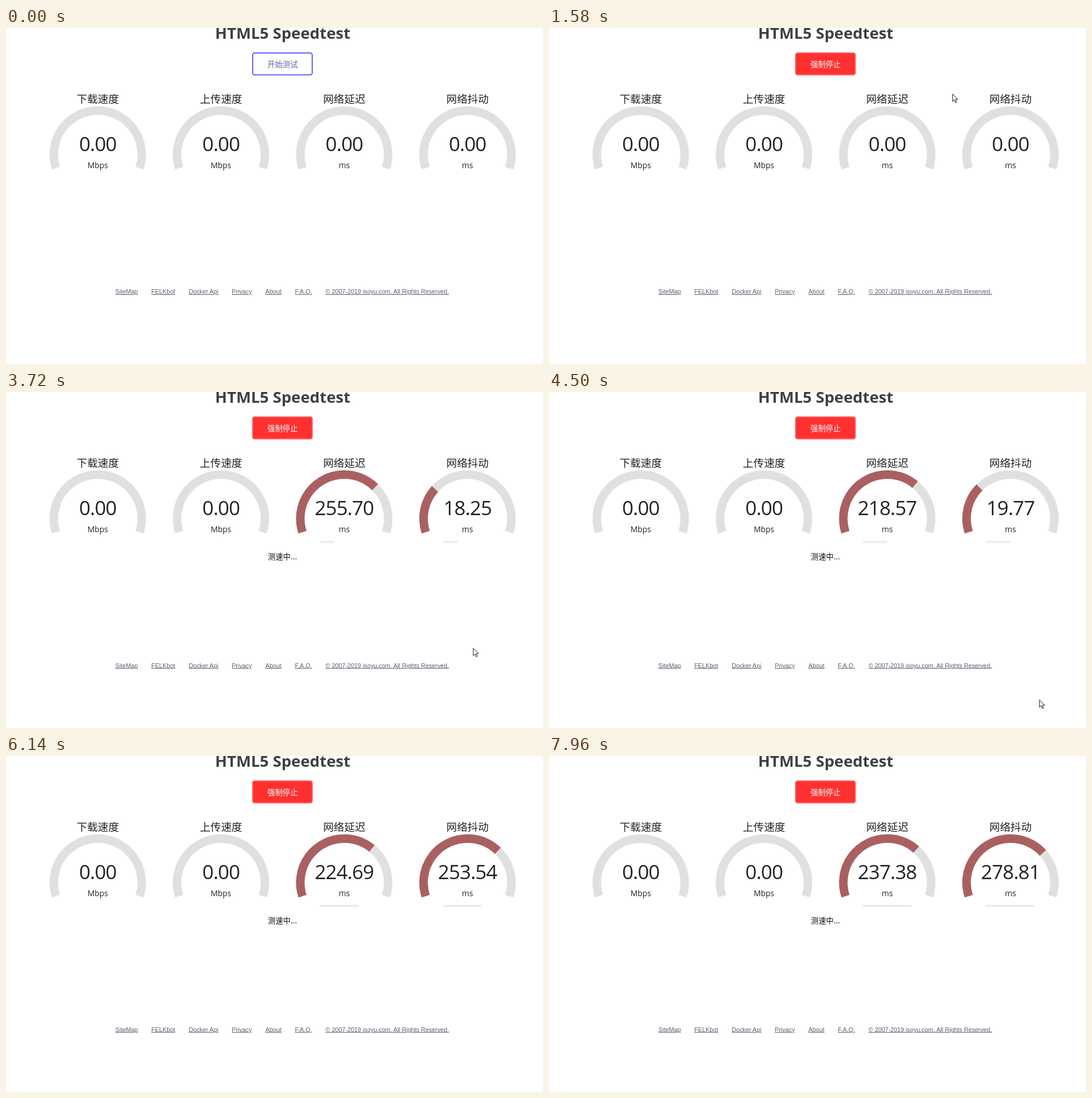
Recreate the animation shown at these times as an HTML page. Size 947 px wide and 592 px high, loop 8 s.

```html
<!DOCTYPE html>
<html lang="zh-CN">
<head>
<meta charset="utf-8">
<title>HTML5 Speedtest</title>
<style>
  html, body { margin: 0; width: 100%; height: 100%; overflow: hidden; background: #fff; }
  svg { display: block; width: 100%; height: 100%; }
  text { font-family: "Open Sans", "Noto Sans", "Noto Sans CJK SC", "Noto Sans CJK", sans-serif; fill: #222; }
  .mid { text-anchor: middle; }
  .title { font-size: 27.6px; font-weight: 700; fill: #404040; }
  .name { font-size: 18.7px; }
  .value { font-size: 35px; letter-spacing: -.9px; }
  .unit { font-size: 13.9px; }
  .small { font-size: 13.4px; }
  .name, .small { font-family: "Noto Sans CJK SC", "Noto Sans CJK", sans-serif; }
  #links text { font: 10.82px "Liberation Sans", Arial, sans-serif; fill: #566272; text-decoration: underline; }
</style>
</head>
<body>
<svg viewBox="0 0 947 592">
  <text class="mid title" x="488" y="18.5">HTML5 Speedtest</text>
  <rect id="button" x="435" y="44" width="105" height="38.5" rx="3.5" stroke-width="2"/>
  <text id="action" class="mid small" x="487.8" y="68.5"></text>
  <g id="meters"></g>
  <text id="status" class="mid small" x="487.5" y="294.8" style="fill:#111">测速中...</text>
  <g id="links"></g>
  <path id="cursor" d="M.5 .5V13.6L3.5 10.8 5.6 15.7 7.7 14.8 5.6 10H9.8Z" fill="#fff" stroke="#111"/>
</svg>
<script>
const LOOP = 8000, CLICK = 1210, START = 1750, FIRST = 2530;
const POLL = 137.5, OVERHEAD = 210;
const $ = id => document.getElementById(id);

function add(parent, tag, attrs, text = '') {
  const el = document.createElementNS('http://www.w3.org/2000/svg', tag);
  for (const k in attrs) el.setAttribute(k, attrs[k]);
  el.textContent = text;
  return parent.appendChild(el);
}

// Dial: 216 degrees, centred on (x, 223)
const R = 77.5, CY = 223, TILT = Math.PI / 10;
function meter([name, unit], i) {
  const g = $('meters'), x = 161.8 + 217.35 * i;
  const dx = R * Math.cos(TILT), y = CY + R * Math.sin(TILT);
  const arc = {
    d: `M${x - dx} ${y}A${R} ${R} 0 1 1 ${x + dx} ${y}`,
    fill: 'none', 'stroke-width': 15, pathLength: 1
  };
  const label = (cls, ly, s) => add(g, 'text', { class: 'mid ' + cls, x, y: ly }, s);
  add(g, 'path', { ...arc, stroke: '#e0e0e0' });
  label('name', 132.2, name);
  label('unit', 247, unit);
  return {
    fill: add(g, 'path', { ...arc, stroke: '#aa6060', visibility: 'hidden' }),
    bar: add(g, 'rect', { x: x - 43.2, y: 262, width: 0, height: 4, fill: '#eee' }),
    value: label('value', 217, '0.00')
  };
}
const [, , ping, jitter] = [
  ['下载速度', 'Mbps'], ['上传速度', 'Mbps'], ['网络延迟', 'ms'], ['网络抖动', 'ms']
].map(meter);

let linkX = 192.8;
for (const s of ['SiteMap', 'FELKbot', 'Docker Api', 'Privacy', 'About', 'F.A.Q.',
  '© 2007-2019 isoyu.com. All Rights Reserved.']) {
  linkX += add($('links'), 'text', { x: linkX, y: 468 }, s).getComputedTextLength() + 23.8;
}

// Round trips in ms; ping and jitter are smoothed from them after a warm-up
const trips = [273.95, 255.7, 239.14, 218.573, 562.058, 221.173, 238.758, 519.01, 237.38];
const samples = [{ at: FIRST, ping: 0, jitter: 0 }];
let clock = 0;
trips.forEach((rtt, i) => {
  const last = samples[i], diff = i ? Math.abs(rtt - trips[i - 1]) : 0;
  const keep = diff > last.jitter ? 0.3 : 0.8;
  clock += rtt + OVERHEAD;
  samples.push({
    at: FIRST + Math.ceil(clock / POLL) * POLL,
    ping: !i || rtt < last.ping ? rtt : last.ping * 0.8 + rtt * 0.2,
    jitter: i < 2 ? diff : last.jitter * keep + diff * (1 - keep)
  });
});

// time, x, y of the pointer
const route = [
  [110, 845, 571], [260, 641, 218], [430, 649, 218], [730, 545, 17], [1040, 490, 62],
  [1300, 490, 62], [1580, 711, 115], [1990, 808, 466], [2370, 823.5, 451],
  [3780, 823.5, 451], [4740, 878, 572], [4910, 898, 594]
];

function pointAt(t) {
  const i = route.findIndex(p => p[0] > t);
  if (i < 1) return null;
  const [a, b] = [route[i - 1], route[i]];
  const k = (t - a[0]) / (b[0] - a[0]);
  return [a[1] + (b[1] - a[1]) * k, a[2] + (b[2] - a[2]) * k];
}

function show(m, ms, done, t) {
  const swing = 1 + 0.02 * Math.sin(t / 100);
  const part = 1 - Math.pow(1.08, -Math.sqrt(ms * swing));
  m.fill.setAttribute('stroke-dasharray', `${part} 2`);
  m.fill.setAttribute('visibility', ms ? 'visible' : 'hidden');
  m.bar.setAttribute('width', 86 * done);
  m.value.textContent = ms.toFixed(2);
}

function draw(t) {
  const running = t >= CLICK, testing = t >= START;
  $('button').setAttribute('fill', running ? '#ff3030' : '#fff');
  $('button').setAttribute('stroke', running ? '#ff6060' : '#6060ff');
  $('action').textContent = running ? '强制停止' : '开始测试';
  $('action').style.fill = running ? '#fff' : '#6060aa';
  $('status').style.display = testing ? '' : 'none';
  $('links').setAttribute('transform', `translate(0 ${testing ? 17.5 : 0})`);

  const n = samples.filter(s => s.at <= t).length;
  const now = samples[Math.max(0, n - 1)];
  show(ping, now.ping, n / samples.length, t);
  show(jitter, now.jitter, n / samples.length, t);

  const at = pointAt(t);
  $('cursor').style.display = at ? '' : 'none';
  if (at) $('cursor').setAttribute('transform', `translate(${at})`);
}

function tick() {
  draw(performance.now() % LOOP);
  requestAnimationFrame(tick);
}
tick();
</script>
</body>
</html>
```
